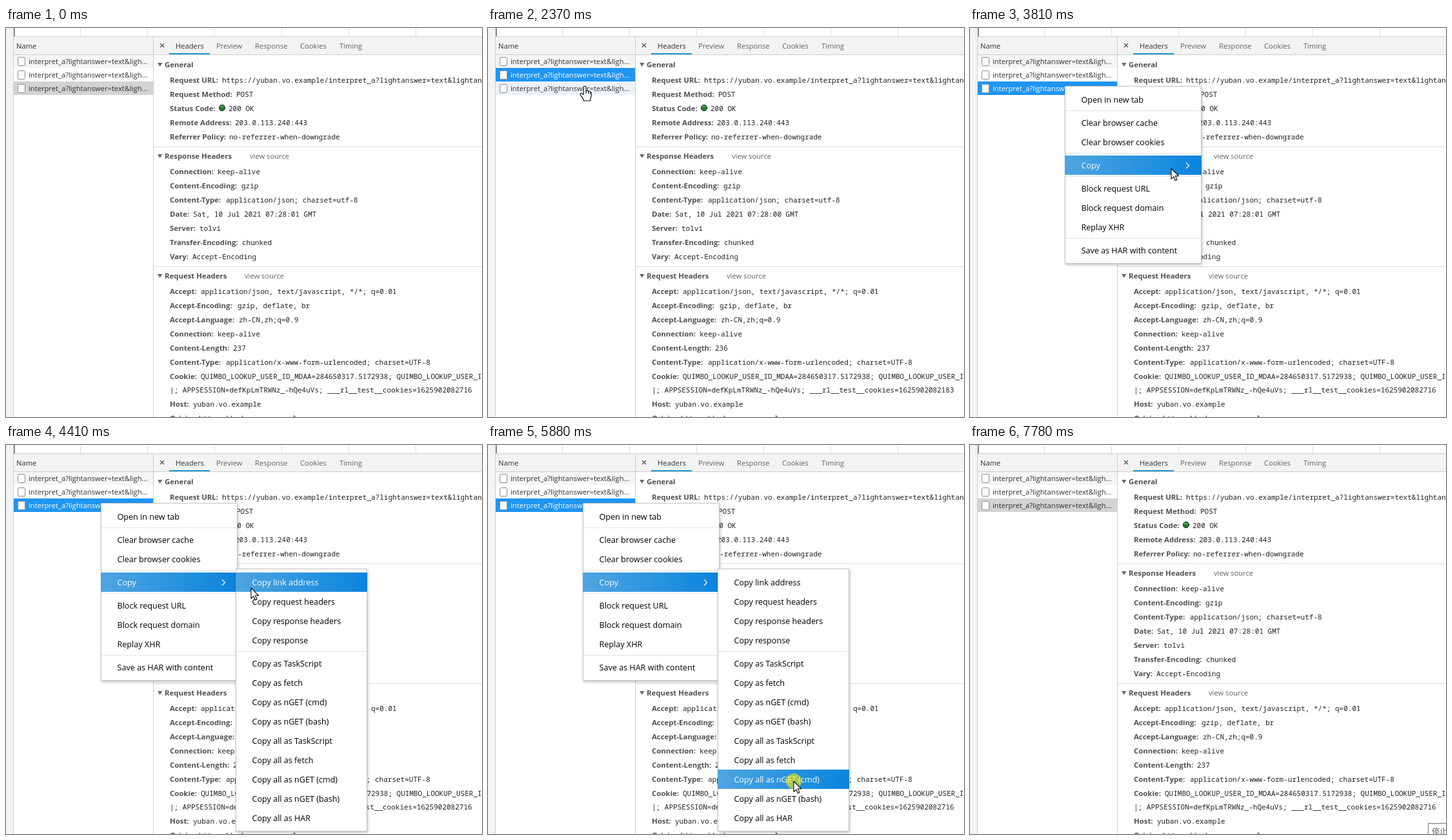
An HTML page for the animation above (7840 ms loop, 738 by 604 pixels).

```html
<!DOCTYPE html>
<html lang="en">
<head>
<meta charset="utf-8">
<title>Network panel</title>
<style>
html, body { margin: 0; width: 100%; height: 100%; overflow: hidden; background: #fff; }
svg { display: block; }
text { font: 11.2px "Open Sans", sans-serif; fill: #303030; white-space: pre; }
.mono { font: 11px "Noto Sans Mono", monospace; fill: #222; }
.label { font-weight: 700; font-size: 11.4px; fill: #505050; }
.dim { fill: #5f6368; }
.line { fill: #cdcdcd; }
.icon { fill: #fff; stroke: #8c8c8c; }
.selected text { fill: #fff; }
.box { fill: #fff; stroke: #c6c6c6; }
.shadow { filter: drop-shadow(1px 2px 2px rgba(0, 0, 0, .25)); }
.item text { font-size: 12.6px; fill: #000; }
.item rect { fill: none; }
.item path { fill: none; stroke: #333; stroke-width: 1.2; }
.item.on text { fill: #fff; }
.item.on rect { fill: url(#hover); }
.item.on path { stroke: #fff; }
.cursor { fill: #fff; stroke: #000; stroke-width: 1.1; stroke-linejoin: round; }
</style>
</head>
<body>
<svg id="stage" width="738" height="604" viewBox="0 0 738 604">
  <defs>
    <linearGradient id="hover">
      <stop offset="0" stop-color="#4fa5e0"/>
      <stop offset="1" stop-color="#0a84de"/>
    </linearGradient>
  </defs>
  <g id="panel"></g>
  <g id="tooltip">
    <rect class="shadow" x="148.5" y="114.5" width="401" height="24" fill="#f2f2f2" stroke="#b4b4b4"/>
    <text id="tipText" x="157" y="131"></text>
  </g>
  <g id="menu"></g>
  <g id="submenu"></g>
  <g id="stopTip">
    <rect x="710.5" y="587.5" width="60" height="24" fill="#fff" stroke="#767676"/>
    <text x="716" y="605" style="font:12px 'Noto Sans CJK SC','Noto Sans CJK',sans-serif;fill:#575757">停止</text>
  </g>
  <g id="pointer">
    <circle id="click" r="12" fill="#ffeb00" fill-opacity=".6"/>
    <path id="arrow" class="cursor" d="M0 0V16.3L3.8 12.8L6.3 18.8L9 17.6L6.5 11.8H11.7Z"/>
    <g id="hand" class="cursor">
      <path d="M-2 2C-2-.4 2-.4 2 2V8C2.8 6.7 5.3 7 5.6 8.6C6.6 7.6 8.4 8.1 8.6 9.6C9.4 9.2 10.2 9.8 10.2 11V15C10.2 18 8.4 19 8.4 23H-1.4C-1.4 20-7 15.2-7 12.6C-7 10.8-4 11-2 13.6Z"/>
      <path fill="none" d="M2 8V12M5.6 8.6V12M8.6 9.6V12.5"/>
    </g>
  </g>
</svg>
<script>
const LOOP = 7840;
const $ = id => document.getElementById(id);
const esc = s => s.replace(/&/g, '&amp;');
const text = (x, y, s, cls = '', id = '') => `<text x="${x}" y="${y}" class="${cls}" id="${id}">${esc(s)}</text>`;
const rect = (x, y, w, h, attrs) => `<rect x="${x}" y="${y}" width="${w}" height="${h}" ${attrs}/>`;
const fill = (id, html) => $(id).insertAdjacentHTML('beforeend', html);

const host = 'https://yuban.vo.example';
const path = 'interpret_a?lightanswer=text&lightanswer=plan';
const url = `${host}/${path}`;
$('tipText').textContent = url;

// Panel frame and request list
const ROW_TOP = [41.5, 62, 83];
let html = rect(0, 0, 11, 604, 'fill="#f3f3f3"') + rect(11, 0, 1, 604, 'class="line"')
  + rect(12, 0, 2, 13, 'fill="#8f8f8f"');
for (let i = 0; i < 6; i++) html += rect(Math.round(115 + i * 103.9), 0, 1, 13, 'fill="#dedede"');
html += rect(12, 14, 726, 27, 'fill="#f3f3f3"') + rect(12, 13, 726, 1, 'class="line"')
  + rect(12, 41, 726, 1, 'class="line"') + text(16, 32, 'Name');
ROW_TOP.forEach((y, i) => {
  html += `<g id="row${i}">` + rect(12, Math.ceil(y), 216, 21, '')
    + rect(18.5, 45.5 + i * 21, 11, 13, 'class="icon" rx="1"')
    + text(35, 56 + i * 21, path.slice(0, 33) + '...') + '</g>';
});
html += rect(228, 14, 1, 590, 'class="line"')
  + '<path d="M239 24l6 6m0-6l-6 6" stroke="#555" stroke-width="1.3"/>'
  + rect(253, 39, 63, 2, 'fill="#1a9bd7"');
[[263, 'Headers'], [326, 'Preview'], [386, 'Response'], [456, 'Cookies'], [517, 'Timing']]
  .forEach(([x, s], i) => html += text(x, 32, s, i ? 'dim' : ''));

// Header sections: label, value, x of value
const section = (y, title, linkX, rows) => {
  html += `<path d="M235 ${y - 7}h7.4l-3.7 6z" fill="#6a6a6a"/>` + text(246, y, title, 'label');
  if (linkX) html += rect(229, y - 19, 509, 1, 'fill="#dcdcdc"') + text(linkX, y, 'view source', 'dim');
  let line = y + 24;
  for (const [label, value, x, id] of rows) {
    html += text(254, line, label && label + ':', 'label') + text(x, line, value, 'mono', id);
    line += label === 'Cookie' ? 21 : 22;
  }
};
section(61, 'General', 0, [
  ['Request URL', url, 335],
  ['Request Method', 'POST', 357],
  ['Status Code', '200 OK', 345],
  ['Remote Address', '203.0.113.240:443', 355],
  ['Referrer Policy', 'no-referrer-when-downgrade', 346],
]);
html += '<circle cx="335" cy="124" r="4.7" fill="#1f7a2a" stroke="#1d3a20"/>'
  + '<ellipse cx="334.5" cy="122" rx="2.5" ry="1.3" fill="#8fc79a" opacity=".6"/>';
section(203, 'Response Headers', 378, [
  ['Connection', 'keep-alive', 328],
  ['Content-Encoding', 'gzip', 365],
  ['Content-Type', 'application/json; charset=utf-8', 341],
  ['Date', '', 290, 'date'],
  ['Server', 'tolvi', 300],
  ['Transfer-Encoding', 'chunked', 366],
  ['Vary', 'Accept-Encoding', 289],
]);
section(389, 'Request Headers', 370, [
  ['Accept', 'application/json, text/javascript, */*; q=0.01', 302],
  ['Accept-Encoding', 'gzip, deflate, br', 359],
  ['Accept-Language', 'zh-CN,zh;q=0.9', 361],
  ['Connection', 'keep-alive', 328],
  ['Content-Length', '', 352, 'length'],
  ['Content-Type', 'application/x-www-form-urlencoded; charset=UTF-8', 341],
  ['Cookie', 'QUIMBO_LOOKUP_USER_ID_MDAA=284650317.5172938; QUIMBO_LOOKUP_USER_ID=', 302],
  ['', '', 254, 'cookie'],
  ['Host', host.slice(8), 290],
  ['Origin', host, 299],
]);
fill('panel', html);

// Context menus; an empty entry is a separator
const ITEMS = { menu: [], submenu: [] };
function buildMenu(id, x, y, w, h, firstY, entries) {
  let out = rect(x + .5, y + .5, w, h, 'class="box shadow"'), mid = firstY;
  for (const s of entries) {
    if (!s) {
      out += rect(x + 1, mid - 13, w - 1, 1, 'fill="#e4e4e4"');
      mid += 6;
      continue;
    }
    out += '<g class="item">' + rect(x, mid - 15, w + 1, 30, '') + text(x + 25.5, mid + 5, s)
      + (s === 'Copy' ? `<path d="M335 ${mid - 4}l4.5 4.5l-4.5 4.5"/>` : '') + '</g>';
    ITEMS[id].push({ mid });
    mid += 30;
  }
  fill(id, out);
  $(id).querySelectorAll('.item').forEach((node, i) => ITEMS[id][i].node = node);
}
buildMenu('menu', 147, 90, 211, 275, 111, ['Open in new tab', '', 'Clear browser cache',
  'Clear browser cookies', '', 'Copy', '', 'Block request URL', 'Block request domain',
  'Replay XHR', '', 'Save as HAR with content']);
buildMenu('submenu', 356, 192, 203, 407, 213, ['Copy link address', 'Copy request headers',
  'Copy response headers', 'Copy response', '', 'Copy as TaskScript', 'Copy as fetch',
  'Copy as nGET (cmd)', 'Copy as nGET (bash)', 'Copy all as TaskScript', 'Copy all as fetch',
  'Copy all as nGET (cmd)', 'Copy all as nGET (bash)', 'Copy all as HAR']);

// Pointer moves: start, end, number of steps, waypoints
const MOVES = [
  [130, 890, 12, [539, 487], [340, 300], [200, 160], [139, 103]],
  [960, 1290, 6, [141, 100], [144, 97]],
  [1690, 1690, 1, [147, 88]],
  [1900, 2370, 8, [148, 84], [150, 74], [150, 72], [149.5, 89.5]],
  [2570, 2630, 2, [150, 90], [148, 90]],
  [2770, 2960, 3, [147, 90], [147, 90]],
  [3120, 3810, 11, [160, 104], [225, 180], [275, 240], [300, 261], [312, 218]],
  [4270, 4820, 9, [330, 219], [380, 222], [425, 380], [446, 503], [456, 517]],
  [4960, 5220, 5, [462, 536], [472, 540]],
  [5480, 5620, 3, [473, 530], [474, 522]],
  [6350, 6700, 6, [490, 530], [684, 605]],
];
const CLICKS = [[2100, 2236], [2570, 2630], [2770, 2900], [5880, 5950]];
const within = (t, a, b) => t >= a && t < b;

// Progress from 0 to 1 in even steps, the first at a and the last at b
function stepped(t, a, b, n) {
  if (n < 2 || t >= b) return 1;
  return Math.max(0, Math.floor((t - a) / (b - a) * (n - 1) + .1)) / (n - 1);
}
function pointerAt(t) {
  const move = MOVES.filter(m => m[0] <= t).pop();
  if (!move) return null;
  const [a, b, n, ...points] = move;
  const pos = stepped(t, a, b, n) * (points.length - 1);
  const i = Math.floor(pos), p = points[i], q = points[i + 1] || p;
  return p.map((v, k) => v + (q[k] - v) * (pos - i));
}
const show = (id, opacity) => {
  $(id).style.display = opacity > 0 ? '' : 'none';
  $(id).style.opacity = opacity;
};
const fade = (t, a, b, n) => t < a ? 0 : (1 + stepped(t, a, b, n) * (n - 1)) / n;
const highlight = (id, match) => ITEMS[id].forEach((item, i) => item.node.classList.toggle('on', match(item, i)));

function render(t) {
  const at = pointerAt(t);
  const [x, y] = at || [-50, -50];
  const menuOpen = within(t, 2830, 5950), subOpen = within(t, 3950, 5950);
  const second = within(t, 2100, 2570), focused = within(t, 2100, 7780);
  const chosen = second ? 1 : 2;

  ROW_TOP.forEach((top, i) => {
    const row = $('row' + i), selected = i === chosen;
    const hovered = !menuOpen && x < 228 && y >= top && y < top + 21;
    row.classList.toggle('selected', selected && focused);
    row.firstChild.style.fill = selected ? (focused ? '#2095f2' : '#d3d3d3')
      : hovered ? '#ecf2fc' : i === 1 ? '#fff' : '#f5f5f5';
  });
  $('date').textContent = `Sat, 10 Jul 2021 07:28:0${second ? 0 : 1} GMT`;
  $('length').textContent = second ? '236' : '237';
  $('cookie').textContent = '|; APPSESSION=defKpLmTRWNz_-hQe4uVs; ___rl__test__cookies=1625902082' + (second ? '183' : '716');

  show('tooltip', fade(t, 960, 1290, 6) - fade(t, 1900, 2034, 3));
  show('menu', menuOpen ? fade(t, 2830, 2960, 2) : 0);
  show('submenu', subOpen ? 1 : 0);
  show('stopTip', fade(t, 7170, 7300, 3));
  highlight('menu', (item, i) => subOpen ? i === 3 : t >= 3120 && Math.abs(y - item.mid) < 15);
  highlight('submenu', item => x > 356 && Math.abs(y - item.mid) < 15);

  show('pointer', at && t < 6700 ? 1 : 0);
  $('pointer').setAttribute('transform', `translate(${Math.round(x)} ${Math.round(y)})`);
  const hand = x < 228 && !menuOpen;
  show('hand', hand ? 1 : 0);
  show('arrow', hand ? 0 : 1);
  show('click', CLICKS.some(([a, b]) => within(t, a, b)) ? 1 : 0);
}
function tick() {
  render(performance.now() % LOOP);
  requestAnimationFrame(tick);
}
tick();
</script>
</body>
</html>
```
